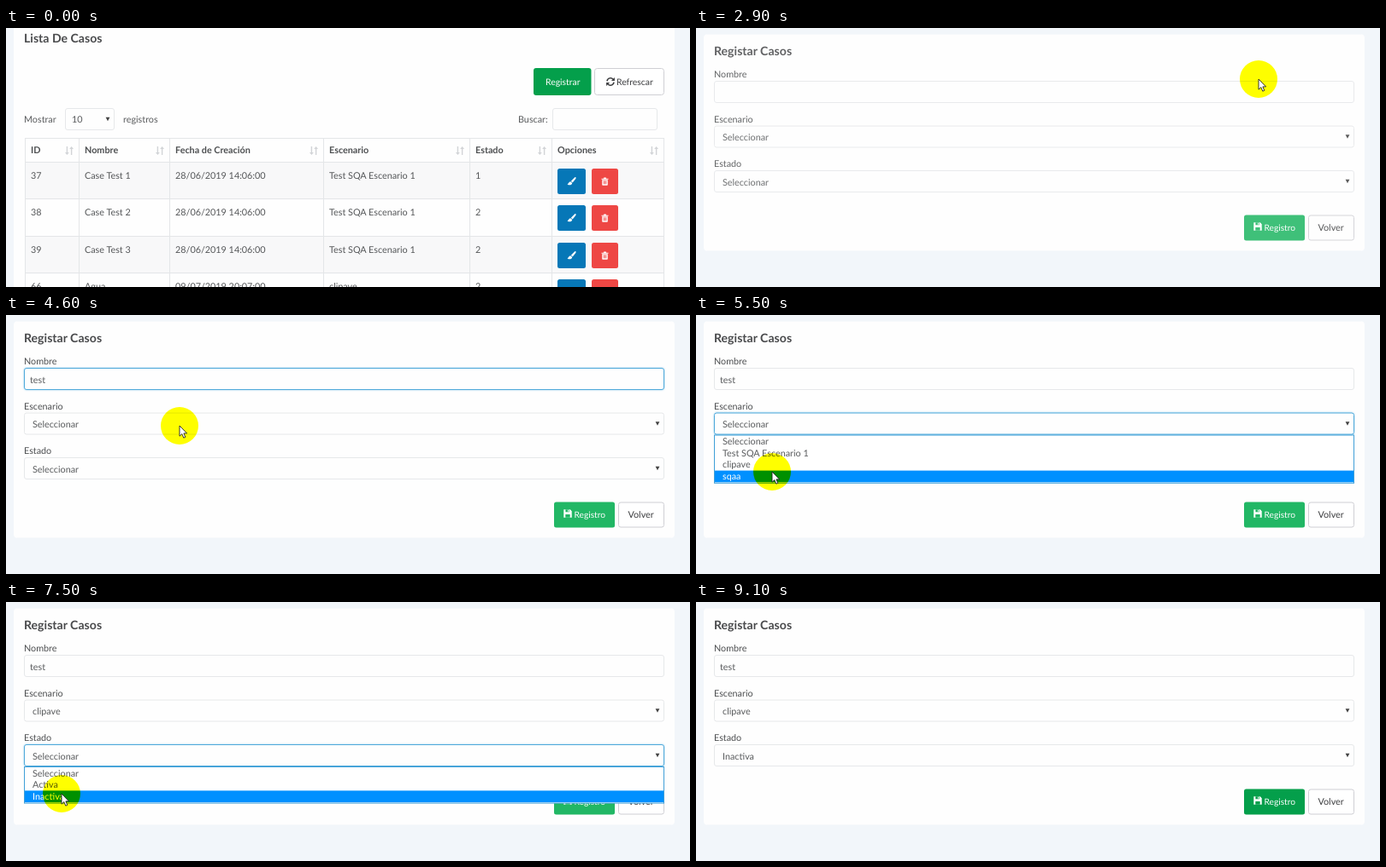
Recreate the animation shown at these times as an HTML page. Size 800x304 px, loop 9.3 s.

```html
<!DOCTYPE html>
<html lang="es">
<head>
<meta charset="utf-8">
<title>Lista De Casos</title>
<style>
html, body { margin: 0; width: 800px; height: 304px; overflow: hidden; background: #f2f6fa; }
svg { display: block; isolation: isolate; }
text { font-family: Lato, "Open Sans", sans-serif; font-size: 10.8px; fill: #5a5c5e; white-space: pre; text-rendering: geometricPrecision; }
.title { font-size: 14.1px; font-weight: 700; fill: #4a4b4d; }
.head { font-weight: 700; fill: #4d4f51; }
.label { fill: #4d4f51; }
.cell { fill: #555759; }
.field { fill: #fefefe; stroke: #e6e8ea; }
.field.focus { stroke: #4fa9da; filter: drop-shadow(0 0 1px #9fd2ee); }
.line { stroke: #e4e6e8; }
.plain { fill: #fff; stroke: #cfcfd4; }
.white { fill: #fff; }
.dark { fill: #3c3d3f; }
</style>
</head>
<body>
<svg id="stage" width="800" height="304" viewBox="0 0 800 304">
  <defs>
    <g id="sort" fill="#d2d4d7">
      <path d="M-3.3-5h1.4V2H-.2L-2.6 5-5 2h1.7z"/>
      <path d="M1.9 5h1.4V-2H5L2.6-5 .2-2h1.7z"/>
    </g>
    <g id="brush" fill="#fff">
      <path d="M4.8-4.8C5.5-4.1 4.9-3.2 4-2L1.2 1.5-.7-.2 3-4C3.8-4.8 4.3-5.2 4.8-4.8z"/>
      <path d="M-1.2.3.7 2C.5 4.2-2.8 5.4-5 3.2-3.4 3.2-3.4.6-1.2.3z"/>
    </g>
    <g id="trash">
      <path fill="#fff" d="M-4-3.3h2.3l.5-1.2h2.4l.5 1.2H4v1H-4zM-3.3-1.8h6.6V4q0 .8-.8.8h-5q-.8 0-.8-.8z"/>
      <path stroke="#ee4744" stroke-width=".8" d="M-1.5-.7v4M0-.7v4M1.5-.7v4"/>
    </g>
    <g id="refresh">
      <path fill="none" stroke="#3c3d3f" stroke-width="1.5" d="M-4-.7A4 4 0 0 1 3.2-2.6M4 .7A4 4 0 0 1-3.2 2.6"/>
      <path fill="#3c3d3f" d="M4.9-4.9V-.9H.9zM-4.9 4.9V.9h4z"/>
    </g>
    <g id="save">
      <path fill="#fff" d="M-4.7-4.7h7.5L4.7-2.8v7.5h-9.4z"/>
      <path class="hole" d="M-2.6-4.7h4.4v2.9h-4.4zM-2.7 1h5.4v3.7h-5.4z"/>
      <path fill="#fff" d="M.1-4.2h1.1v1.9H.1z"/>
    </g>
  </defs>
  <rect width="800" height="304" fill="#f2f6fa"/>
  <rect id="card" x="9" width="773" rx="4" fill="#fefefe"/>
  <g id="list"></g>
  <g id="form"></g>
  <g id="menu"></g>
  <circle id="halo" r="22" fill="#ff0" style="mix-blend-mode:multiply"/>
  <path id="arrow" d="M0 0V12.2L2.8 9.6 4.8 14.2 6.8 13.3 4.9 8.9H8.6z" fill="#fff" stroke="#222" stroke-width=".9"/>
</svg>
<script>
const LOOP = 9300, STEP = 100;
const $ = id => document.getElementById(id);
const list = $('list'), form = $('form'), menu = $('menu');

function add(parent, tag, attrs, content) {
  const el = document.createElementNS('http://www.w3.org/2000/svg', tag);
  for (const k in attrs) el.setAttribute(k, attrs[k]);
  if (content !== undefined) el.textContent = content;
  parent.appendChild(el);
  return el;
}
const text = (p, x, y, str, cls = '', size) =>
  add(p, 'text', size ? { x, y, class: cls, style: `font-size:${size}px` } : { x, y, class: cls }, str);
const rect = (p, x, y, width, height, attrs) => add(p, 'rect', { x, y, width, height, ...attrs });
const icon = (p, id, x, y) => add(p, 'use', { href: '#' + id, transform: `translate(${x} ${y})` });
const field = (p, x, y, w, h) => rect(p, x + .5, y + .5, w - 1, h - 1, { rx: 2.5, class: 'field' });
const caret = (p, x, y) => add(p, 'path', { d: `M${x - 2.4} ${y - 2.2}h4.8l-2.4 4.4z`, fill: '#444' });

function buildList() {
  text(list, 21, 16.5, 'Lista De Casos', 'title');
  rect(list, 617, 47, 67.5, 32, { rx: 3, fill: '#049f4b' });
  text(list, 631, 67, 'Registrar', 'white', 10.4);
  rect(list, 688.5, 47.5, 81, 31, { rx: 3, class: 'plain' });
  icon(list, 'refresh', 707, 63);
  text(list, 714, 67, 'Refrescar', 'dark', 10.4);

  text(list, 21, 111.3, 'Mostrar');
  field(list, 69, 94, 58, 26);
  text(list, 77, 111.3, '10');
  caret(list, 119, 107);
  text(list, 137, 111.3, 'registros');
  text(list, 599, 111.3, 'Buscar:');
  field(list, 639, 94, 123, 26);

  const cols = [22, 85, 191, 371, 542, 638, 769];
  const heads = ['ID', 'Nombre', 'Fecha de Creación', 'Escenario', 'Estado', 'Opciones'];
  const rows = [
    ['37', 'Case Test 1', '28/06/2019 14:06:00', 'Test SQA Escenario 1', '1'],
    ['38', 'Case Test 2', '28/06/2019 14:06:00', 'Test SQA Escenario 1', '2'],
    ['39', 'Case Test 3', '28/06/2019 14:06:00', 'Test SQA Escenario 1', '2'],
    ['66', 'Agua', '09/07/2019 20:07:00', 'clipave', '2']
  ];
  rows.forEach((row, r) => {
    const y = Math.round(158 + r * 43.4);
    if (r % 2 === 0) rect(list, 22, y, 747, 43.4, { fill: '#f8f8f9' });
    add(list, 'path', { d: `M22 ${y - .5}H769`, class: 'line' });
    row.forEach((s, c) => text(list, cols[c] + 7, y + 18.6, s, 'cell'));
    rect(list, 645, y + 7, 33, 30, { rx: 2.5, fill: '#0677b7' });
    icon(list, 'brush', 661.5, y + 22);
    rect(list, 685, y + 7, 31, 30, { rx: 2.5, fill: '#ee4744' });
    icon(list, 'trash', 700.5, y + 22);
  });
  add(list, 'path', { d: 'M22 129.5H769', class: 'line' });
  cols.forEach(x => add(list, 'path', { d: `M${x + .5} 129V304`, class: 'line' }));
  heads.forEach((s, c) => {
    text(list, cols[c] + 7, 147.3, s, 'head');
    icon(list, 'sort', cols[c + 1] - 11, 144);
  });
}

function buildForm() {
  text(form, 21, 31.7, 'Registar Casos', 'title');
  const parts = ['Nombre', 'Escenario', 'Estado'].map((label, i) => {
    const top = [62, 114.5, 167][i];
    text(form, 21, top - 3.7, label, 'label');
    const box = field(form, 21, top, 749, 26);
    const value = text(form, i ? 31 : 28, top + 17.5, '');
    if (i) caret(form, 762, top + 13);
    return { box, value };
  });
  const save = rect(form, 641, 219.5, 71, 30, { rx: 2.5 });
  icon(form, 'save', 657, 233);
  text(form, 664.5, 238, 'Registro', 'white', 10.2);
  rect(form, 716.5, 220, 53, 29, { rx: 2.5, class: 'plain' });
  text(form, 727.5, 238, 'Volver', 'dark');
  return { parts, save };
}

function buildMenu(top, options) {
  const g = add(menu, 'g', {});
  const h = options.length * 13.7 + 1.5;
  rect(g, 21.5, top + .5, 748, h, { fill: '#fff', stroke: '#3f9fd8' });
  const bar = rect(g, 22, 0, 747, 13.7, { fill: '#0090ff' });
  const labels = options.map((s, i) => text(g, 31, top + 11.5 + i * 13.7, s));
  return {
    show(open, cursorY) {
      g.setAttribute('display', open ? 'inline' : 'none');
      if (!open) return;
      const i = Math.max(0, Math.min(options.length - 1, Math.floor((cursorY - top - 1) / 13.7)));
      bar.setAttribute('y', top + 1 + i * 13.7);
      labels.forEach((el, n) => el.setAttribute('class', n === i ? 'white' : ''));
    }
  };
}

buildList();
const { parts, save } = buildForm();
const scenes = buildMenu(140.5, ['Seleccionar', 'Test SQA Escenario 1', 'clipave', 'sqaa']);
const states = buildMenu(193, ['Seleccionar', 'Activa', 'Inactiva']);

// Pointer path: time, x, y
const path = [
  [100, 654, 60], [300, 660, 60], [800, 660, 60], [1000, 666, 61], [1300, 658, 60],
  [2900, 658, 60], [3200, 590, 70], [3500, 470, 82], [3700, 412, 86], [4200, 400, 88],
  [4400, 245, 178], [4600, 203, 130], [4800, 150, 129], [5000, 130, 131], [5200, 108, 158],
  [5500, 89, 184], [5700, 88, 182], [5800, 88, 182], [6100, 74, 176], [6300, 72, 176],
  [6800, 60, 176], [7000, 58, 174], [7200, 58, 179], [7500, 65, 225], [7600, 65, 228],
  [7800, 65, 228], [8100, 170, 262], [8400, 380, 284], [8700, 610, 284], [8900, 676, 238], [9100, 676, 236]
];

function pointer(t) {
  const i = path.findIndex(p => p[0] >= t);
  if (i <= 0) return path[0].slice(1);
  const [a, b] = [path[i - 1], path[i]];
  const k = (t - a[0]) / (b[0] - a[0]);
  return [a[1] + (b[1] - a[1]) * k, a[2] + (b[2] - a[2]) * k];
}
const clamp = v => Math.max(0, Math.min(1, v));

function draw(t) {
  const inList = t < 1900;
  $('card').setAttribute('y', inList ? -10 : 7.5);
  $('card').setAttribute('height', inList ? 330 : 254);
  list.setAttribute('opacity', 1 - clamp((t - 1800) / 500));
  form.setAttribute('opacity', 1 - (1 - clamp((t - 2300) / 1000)) ** 2.2);

  const focus = t < 3900 || t >= 9100 ? -1 : t < 4900 ? 0 : t < 7100 ? 1 : 2;
  parts.forEach((p, i) => p.box.setAttribute('class', i === focus ? 'field focus' : 'field'));
  parts[0].value.textContent = 'test'.slice(0, clamp((t - 3900) / 400) * 4);
  parts[1].value.textContent = t < 6300 ? 'Seleccionar' : 'clipave';
  parts[2].value.textContent = t < 7800 ? 'Seleccionar' : 'Inactiva';

  const green = t >= 8900 ? '#049f4b' : '#22b765';
  save.setAttribute('fill', green);
  document.querySelector('.hole').setAttribute('fill', green);

  const visible = t >= 100 && t < 9100;
  const [x, y] = pointer(Math.min(t, 9100));
  for (const id of ['halo', 'arrow']) {
    $(id).setAttribute('display', visible ? 'inline' : 'none');
    $(id).setAttribute('transform', `translate(${x} ${y})`);
  }
  scenes.show(t >= 5000 && t < 6300, y);
  states.show(t >= 7200 && t < 7800, y);
}

const start = performance.now();
function tick() {
  const t = (performance.now() - start) % LOOP;
  draw(Math.floor(t / STEP) * STEP);
  requestAnimationFrame(tick);
}
tick();
</script>
</body>
</html>
```
